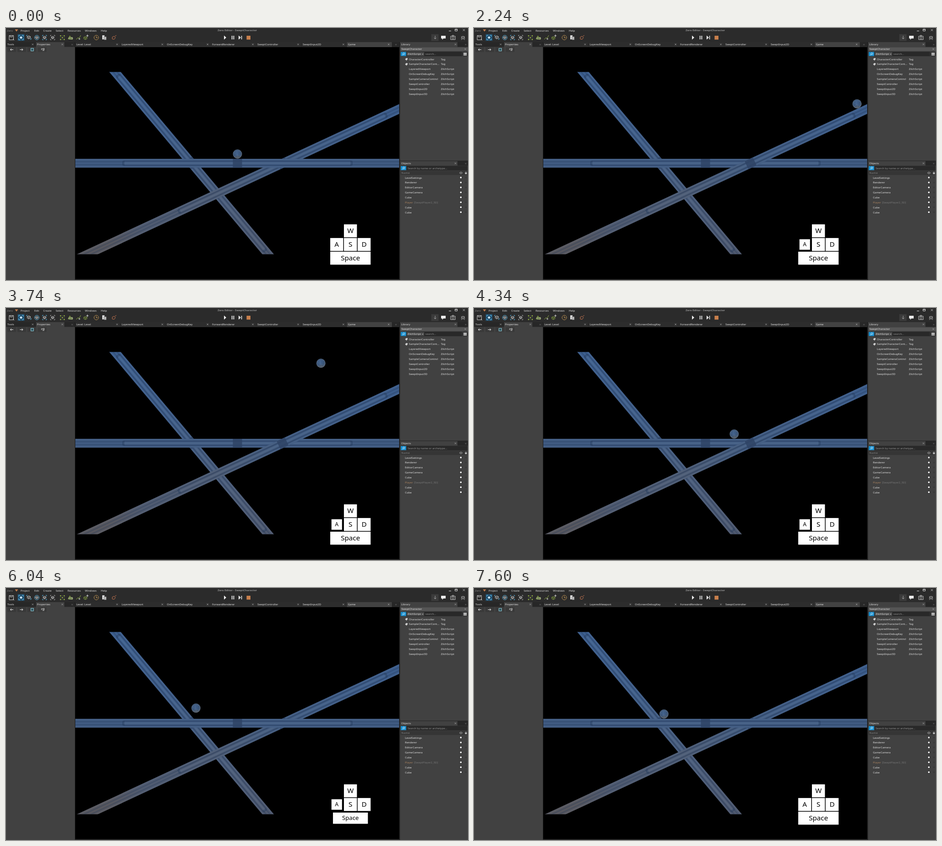
These frames come from a looping animation (1013 by 553 pixels, 7650 ms). An HTML page:

```html
<!DOCTYPE html>
<html lang="en">
<head>
<meta charset="utf-8">
<title>Zero Editor - SweptCharacter</title>
<style>
html, body { margin: 0; width: 100%; height: 100%; overflow: hidden; background: #2b2b2b; }
svg { display: block; width: 1013px; height: 553px; }
text { font-family: "Noto Sans", "Open Sans", sans-serif; font-size: 6.02px; fill: #e2e2e2; white-space: pre; }
.key text { font-size: 15.2px; fill: #000; text-anchor: middle; }
</style>
</head>
<body>
<svg id="stage" viewBox="0 0 1013 553" xmlns="http://www.w3.org/2000/svg">
  <defs>
    <clipPath id="level"><rect x="152" y="96.6" width="710" height="399.8"/></clipPath>
    <radialGradient id="skin" cx=".45" cy=".4" r=".62">
      <stop offset="0" stop-color="#40608c"/><stop offset=".65" stop-color="#3b5577"/><stop offset="1" stop-color="#566273"/>
    </radialGradient>
  </defs>
  <g id="ui"></g>
  <g id="icons" fill="none"></g>
  <rect x="152" y="42" width="710" height="509" fill="#000"/>
  <g id="beams" clip-path="url(#level)"></g>
  <g id="ball">
    <circle r="10" fill="url(#skin)"/>
    <path d="M-9-3L-2-6L7-6M-2-6L0 2L8 4M0 2L-7 6M0 2L1 9.5M-9-3L0 2" fill="none" stroke="#7890ac" stroke-opacity=".3" stroke-width=".8"/>
    <path d="M-6 7L1 3L7 7A9.5 9.5 0 0 1-6 7Z" fill="#68655f" fill-opacity=".35"/>
    <circle r="9.5" fill="none" stroke="#6d7885" stroke-opacity=".5" stroke-width=".9"/>
  </g>
  <g id="keys"></g>
</svg>
<script>
const NS = "http://www.w3.org/2000/svg";
const $ = id => document.getElementById(id);
function add(parent, tag, attrs, content) {
  const el = document.createElementNS(NS, tag);
  for (const k in attrs) el.setAttribute(k, attrs[k]);
  if (content) el.textContent = content;
  return parent.appendChild(el);
}
const ui = $("ui"), icons = $("icons");
const box = (x, y, width, height, fill, parent = ui) => add(parent, "rect", { x, y, width, height, fill });
const label = (x, y, s, fill = "#e2e2e2", extra) => add(ui, "text", { x, y, style: "fill:" + fill, ...extra }, s);
const icon = (d, stroke = "#dcdcdc", fill = "none", w = 1) =>
  add(icons, "path", { d, stroke, fill, "stroke-width": w });
const cross = (x, y, s = 1.7, c = "#a8a8a8") =>
  icon(`M${x - s} ${y - s}l${2 * s} ${2 * s}m0 ${-2 * s}l${-2 * s} ${2 * s}`, c, "none", .8);

// Title, menu and tool bar
box(0, 0, 1013, 553, "#2b2b2b");
label(2, 7.6, "Zero", "#8b8b8b");
icon("M19.5 3h7l-3.5 5z", "none", "#c07a4a");
[[32, "Project"], [62, "Edit"], [81.5, "Create"], [109, "Select"], [135, "Resources"], [173, "Windows"], [208, "Help"]]
  .forEach(([x, s]) => label(x, 7.6, s));
label(464, 6.8, "Zero Editor - SweptCharacter", "#929292", { "font-weight": 600 });
icon("M971 6.5h5", "#ddd");
icon("M984.5 2.5h5v4h-5zM984.5 3.2h5", "#ddd");
cross(1004, 4.5, 2.3, "#ddd");

icon("M7 16.5h9.5v9.5h-9.5zM9 16.5v3h5v-3M15 24l3 3", "#dcdcdc", "none", .9);
box(25.5, 13.5, 15, 14.5, "#24516f");
icon("M28 19v-3h3M35 16h3v3M38 23v3h-3M31 26h-3v-3", "#65c3f0");
icon("M33 18l3 3l-3 3l-3-3z", "none", "#d5eefb");
const cubeIcon = (x, y, r, c) =>
  icon(`M${x} ${y - r}l${r} ${r / 2}v${r}l${-r} ${r / 2}l${-r} ${-r / 2}v${-r}zM${x - r} ${y - r / 2}l${r} ${r / 2}l${r} ${-r / 2}M${x} ${y}v${r}`, c, "none", .8);
cubeIcon(50, 20.5, 3.4, "#e5e5e5");
icon("M45 18v-2h2M53 25h2v-3", "#57b7e4");
icon("M67.5 16a5 5 0 1 0 .1 0", "#57b7e4");
cubeIcon(67.5, 21, 2.7, "#eee");
icon("M80 18v-2h2M87 16h2v2M89 24v2h-2M82 26h-2v-2", "#57b7e4");
cubeIcon(84.5, 21, 3, "#eee");
icon("M97.5 18v-2h2M105 16h2v2M107 24v2h-2M99.5 26h-2v-2", "#ccc", "none", .8);
cubeIcon(102.3, 21, 2.8, "#eee");
for (let i = 0; i < 9; i++) box(118.5 + i % 3 * 4, 16 + (i / 3 | 0) * 4, 2.4, 2.4, i % 2 ? "#444" : "#96b545", icons);
icon("M136 24l4-7l3 5l2-2l1 5z", "#96b545", "#566b2f", .8);
icon("M138 24h8v-3h-8z", "#ddd", "none", .7);
icon("M154 25l4-4l2 2l4-7", "#96b545", "none", .9);
icon("M159 24h4M161 22v4", "#ddd", "none", .8);
cubeIcon(174, 22, 3.4, "#96b545");
icon("M176 17h5M178.5 14.5v5", "#ddd");
icon("M198 16a5 5 0 1 0 .1 0M198 18v3.5h3", "#c99b55");
icon("M211 16h5v9h-5z", "none", "#d8d8d8");
icon("M215 19h5v7h-5z", "#555", "#bbb", .6);
icon("M233 24v-4l4-2l3 3l-3 4zM239 18l3-2", "#c4744f");
icon("M478 16.5l5 4.5l-5 4.5z", "none", "#eee");
icon("M495.6 17v8M499.4 17v8", "#eee", "none", 1.8);
icon("M510 16.5l5 4.5l-5 4.5z", "none", "#eee");
icon("M516.6 17v8", "#eee", "none", 1.5);
box(527.5, 17, 8.5, 8.5, "#c9804c", icons);
box(932.5, 13.5, 16, 15, "#3b3b3b");
icon("M941 17v7M938.5 21.5l2.5 2.5l2.5-2.5", "#b0b0b0", "none", .9);
icon("M954 17h10v6h-5l-2.5 3v-3h-2.5z", "none", "#eee");
icon("M975 18h10v7.5h-10zM978 18l1-2h2l1 2M980 19.5a2.2 2.2 0 1 0 .1 0", "#ddd", "none", .9);
icon("M1002 18a2 3 0 1 0 .1 0M998 18l2 2M1006 18l-2 2M997.5 22h2.5M1004 22h2.5M998 26l2-2M1006 26l-2-2", "#ddd", "none", .9);

// Left panel
box(0, 31, 1013, 11, "#272727");
box(0, 41.5, 151, 511.5, "#414141");
box(66, 31, 62, 11, "#414141");
label(3, 38, "Tools"); cross(58.5, 36);
label(68, 38, "Properties"); cross(123.5, 36);
const corner = (x, y) => cross(x, y, 1.5, "#696969");
corner(145, 36.5);
for (const x of [3, 25, 47, 70]) box(x, 42.5, 19, 10, "#393939");
icon("M9.5 47.5h6.5M12 45l-2.5 2.5l2.5 2.5M30.5 47.5h6.5M34.5 45l2.5 2.5l-2.5 2.5", "#eee");
icon("M54.5 44.5h6v6h-6z", "#8cc7d2", "#355761");
icon("M77 45.5h3M77 47.5h2M81 45h3v2.5h-3zM80 49.5h4", "#ddd", "none", .9);
box(151, 31, 1, 522, "#1b1b1b");

// Document tabs
["Level: Level", "LayeredViewport", "OnScreenDebugKey", "ForwardRenderer", "SweptController", "SweptInput2D", "Game"].forEach((s, i) => {
  const x = 152 + i * 99.25;
  box(x, 31, 98.5, 11, i == 6 ? "#424242" : "#2d2d2d");
  label(x + 2.2, 38, s);
  cross(x + 91.5, 36);
});
corner(855, 36.5);
box(862, 31, 2, 522, "#202020");

// Library
box(864, 41.5, 149, 250, "#414141");
box(864, 31, 126, 11, "#414141");
label(866.5, 38, "Library"); cross(985.5, 36); corner(1008, 36.5);
box(865, 42.5, 147, 8, "#555");
label(867, 48.4, "SweptCharacter");
icon("M1005 45.5h4l-2 2.3z", "none", "#a5a5a5");
const search = (y, w) => {
  box(865, y, w, 10, "#292929");
  box(865.5, y + .5, 12, 9, "#1a91d2");
  icon(`M872.3 ${y + 2.5}a2 2 0 1 0 .1 0M870.8 ${y + 6}l-2 2`, "#fff", "none", .9);
};
search(52, 135);
box(879, 53, 38, 8, "#4a4a4a");
label(880.5, 59.4, "ZilchScript"); cross(913.5, 57.5, 1.2, "#ccc");
label(919.5, 59.4, "search...", "#8e8e8e");
box(1001, 52.5, 11, 9.5, "#303030");
for (let i = 0; i < 4; i++) box(1003.3 + i % 2 * 3.6, 54.3 + (i >> 1) * 3.3, 3, 2.7, "#e5e5e5", icons);
["CharacterController", "SampleCharacterCont...", "LayeredViewport", "OnScreenDebugKey", "SampleCameraControl", "SweptController", "SweptInput2D", "SweptInput3D"].forEach((s, i) => {
  const y = 70.6 + i * 10.87;
  label(883.3, y, s);
  label(953.5, y, i < 2 ? "Tag" : "ZilchScript");
  if (i < 2) icon(`M875 ${y - 2}l2.5-2.5h3v3l-2.5 2.5z`, "none", "#d0d0d0");
});

// Objects
box(864, 291, 149, 11, "#272727");
box(864, 292, 126, 10, "#414141");
box(864, 302, 149, 251, "#414141");
label(866.5, 299, "Objects"); cross(985.5, 297); corner(1008, 297.5);
search(302.5, 147);
label(880.5, 309.9, "Search by name or archetype...", "#929292");
box(865, 313.5, 147, 9, "#353535");
label(867, 320, "Name", "#868686", { "letter-spacing": .4 });
icon("M994 318q3.5-4 7 0q-3.5 4-7 0M997.5 317v2", "#bbb", "none", .8);
icon("M1006.5 317.5h4v3h-4z", "none", "#ccc");
icon("M1007.3 317.5v-1.5h2.4v1.5", "#ccc", "none", .7);
["LevelSettings", "Renderer", "EditorCamera", "GameCamera", "Cube", "Player", "Cube", "Cube"].forEach((s, i) => {
  const y = 330.5 + i * 10.87;
  label(874.7, y, s, i == 5 ? "#a9825f" : "#e2e2e2");
  if (i == 5) label(894.5, y, "[SweptPlayer2_5D]", "#777");
  box(994.4, y - 5.3, 5.8, 5.8, "#333", icons);
  box(995.6, y - 4.1, 3.4, 3.4, "#eee", icons);
  box(1007, y - 3.8, 3, 3, "#383838");
});
box(151, 551, 712, 2, "#262626");

// Beams: one striped texture laid along each angle, tinted from end to end
function beam(cx, cy, angle, tints) {
  const id = "g" + Math.abs(angle), g = add($("beams"), "g", { transform: `translate(${cx} ${cy}) rotate(${angle})` });
  const grad = add(document.querySelector("defs"), "linearGradient", { id, gradientUnits: "userSpaceOnUse", x1: -420, x2: 420, y1: 0, y2: 0 });
  for (const [offset, tint] of tints) add(grad, "stop", { offset, "stop-color": tint });
  const strip = (x, y, w, h, fill, op) => box(x, y, w, h, fill, g).setAttribute("fill-opacity", op);
  strip(-520, -9.75, 1040, 19.5, `url(#${id})`, 1);
  for (const s of [-1, 1]) {
    strip(-250, s * 4.6 - 1.2, 500, 2.4, "#1f3252", .42);
    strip(s < 0 ? -520 : 250, -4.6, 270, 2.6, "#1f3252", .28);
    strip(s < 0 ? -520 : 250, 2, 270, 2.6, "#1f3252", .28);
    strip(-520, s * 8 - 1, 1040, 2, "#7f93ae", .1);
    strip(s * 250 - 2.5, -5, 5, 10, "#223759", .42);
  }
  strip(-250, -1.6, 500, 3.2, "#7f93ae", .16);
  strip(-10, -9.75, 20, 19.5, "#2e4366", .85);
  return g;
}
beam(406.7, 296.3, 50, [[0, "#3b6093"], [.42, "#3f5d88"], [.62, "#4a5c7a"], [.85, "#50586c"]]);
const slope = beam(606.5, 296.95, -25, [[-0.1, "#58585f"], [.1, "#505b70"], [.32, "#4c5b74"], [.5, "#415b80"], [.85, "#3c5d8c"]]);
const floor = beam(507.5, 296.75, 0, [[0, "#405b82"], [1, "#405b82"]]);

// Keys: centre, width, pressed scale, hold spans
const keys = [
  ["W", 755.2, 445.1, 28.5, .81, []],
  ["A", 725.2, 475.1, 28.5, .81, [[2110, 7545]]],
  ["S", 755.2, 475.1, 28.5, .81, []],
  ["D", 785.2, 475.1, 28.5, .81, [[445, 2110], [2850, 3465], [7545, 7595]]],
  ["Space", 755.2, 505.1, 88.5, .865, [[620, 900], [3065, 3400], [4445, 4760], [5450, 5700], [6010, 6300]]]
].map(([name, x, y, w, scale, holds]) => {
  const el = add($("keys"), "g", { class: "key" });
  box(-w / 2, -14.25, w, 28.5, "#fff", el);
  add(el, "text", { x: 0, y: 4.9 }, name);
  return { el, x, y, scale, holds };
});

// Motion
const LOOP = 7650, G = 4.69e-4, SLIDE = 2.76e-4, FLOOR_Y = 276.5;
const groundY = x => Math.min(FLOOR_Y, 156 + (862 - x) * .4667);
const wallX = y => 416.5 + (y - FLOOR_Y) * .8396;

// Velocity knots [ms, px per ms], joined by straight ramps
const run = [[442, 0], [622, .2], [2110, .2], [2470, -.2], [2857, -.2], [3037, 0], [3465, 0], [3645, -.2], [5335, -.2]];
const leap = [[6122, 0], [6302, -.2], [6668, -.2]];
function travel(x, knots, t) {
  for (let i = 1; i < knots.length; i++) {
    const [a, u] = knots[i - 1], [b, v] = knots[i];
    if (t <= a) break;
    const d = Math.min(t, b) - a;
    x += u * d + (v - u) * d * d / (b - a) / 2;
  }
  return x;
}
// Jumps: [take-off, apex time, apex height]
const jumps = [[623, 1130, 156], [3070, 3561, 106], [4452, 4959, 156], [6013, 6520, 156]];
function flight(t, ground) {
  const j = jumps.filter(j => t >= j[0]).pop();
  return j ? Math.min(ground, j[2] + G * (t - j[1]) ** 2) : ground;
}
function slide(t, start, y0) {
  const y = Math.min(FLOOR_Y, y0 + SLIDE * (t - start) ** 2);
  return [wallX(y), y];
}
function ballAt(t) {
  if (t >= 6668) return slide(t, 6668, 168);
  if (t >= 6013) return [travel(416.5, leap, t), flight(t, FLOOR_Y)];
  if (t >= 5335) return slide(t, 5335, 222.5);
  const x = travel(507.5, run, t);
  return [x, flight(t, groundY(x))];
}

let slopeFront = false;
function draw(now) {
  const t = now % LOOP, [x, y] = ballAt(t);
  $("ball").setAttribute("transform", `translate(${x.toFixed(2)} ${y.toFixed(2)})`);
  // Draw order of the two beams follows the side the ball is on
  const front = x > 540;
  if (front !== slopeFront) {
    $("beams").appendChild(front ? slope : floor);
    slopeFront = front;
  }
  for (const k of keys) {
    const s = k.holds.some(([a, b]) => t >= a && t < b) ? k.scale : 1;
    k.el.setAttribute("transform", `translate(${k.x} ${k.y}) scale(${s})`);
  }
}
const begin = performance.now();
function tick() {
  draw(performance.now() - begin);
  requestAnimationFrame(tick);
}
tick();
</script>
</body>
</html>
```
